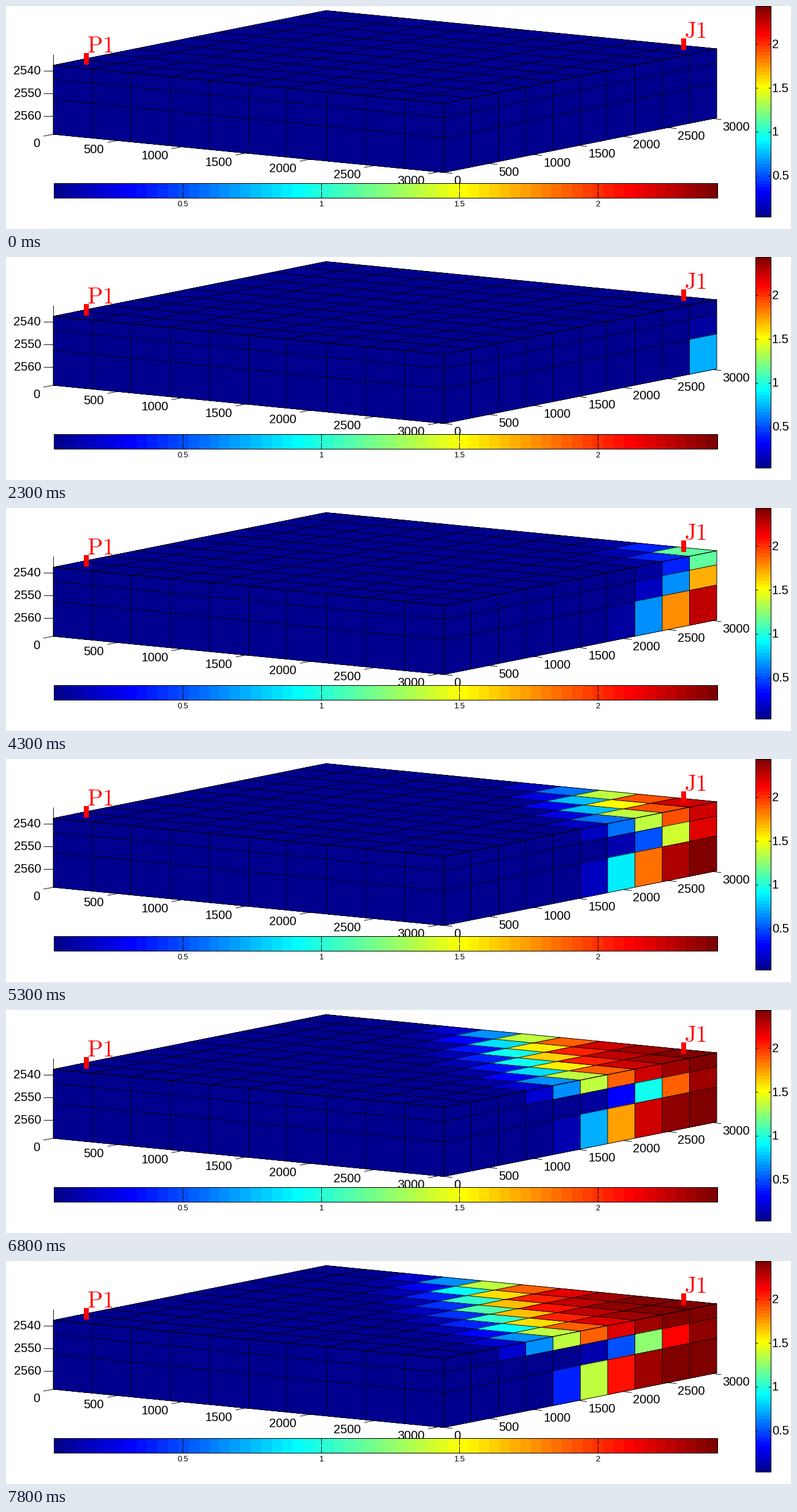
A matplotlib script for the animation above (8 s loop, 1280 by 365 pixels).

```python
import numpy as np
import matplotlib.pyplot as plt
from matplotlib.animation import FuncAnimation
from matplotlib.collections import LineCollection, PolyCollection
from matplotlib.patches import Rectangle

W, H, DPI = 1280, 365, 100
PX = 72 / DPI
INTERVAL, FRAMES = 100, 80
CELLS = 10
V_MIN, V_MAX = 0.0347, 2.432

plt.rcParams["font.family"] = "Liberation Sans"
plt.rcParams["mathtext.fontset"] = "cm"

# Projected block: left corner, one cell along each side, layer depths.
LEFT = np.array([77.0, 97.0])
EX = np.array([63.7, 6.25])
EY = np.array([44.5, -8.95])
DEPTHS = (0, 23, 56, 113)

# Per layer: key points (step, front position in cells from the injector),
# then how steeply the concentration falls ahead of and behind the front.
TOP = [(5, -2.2), (6, -1.33), (8, -0.07), (10, 2.2), (13, 4.24), (15, 5.24)], 1.25, 0.95
MIDDLE = [(4, -1.5), (6, -0.43), (8, 0.42), (10, 1.15), (15, 2.05)], 1.35, 1.65
BOTTOM = [(0, -1.5), (2, -0.7), (5, -0.1), (6, 0.39), (10, 2.72), (15, 4.16)], 1.8, 1.4


def concentration(layer, step, distance):
    """Logistic front that moves away from the injector and flattens."""
    keys, ahead, behind = layer
    offset = distance - np.interp(step, *zip(*keys))
    slope = np.where(offset > 0, ahead, behind) * (1 + 1.2 * np.exp(-step / 5))
    return V_MAX / (1 + np.exp(slope * offset))


def jet(n=64):
    k = np.arange(1, n + 1)

    def ramp(i):
        return np.clip(np.minimum(i, 48 - i) / 16, 0, 1)

    return np.stack([ramp(k - 24), ramp(k - 8), ramp(k + 8)], axis=1)


JET = jet()


def color_of(values):
    k = (values - V_MIN) / (V_MAX - V_MIN) * len(JET)
    return JET[np.clip(k.astype(int), 0, len(JET) - 1)]


def corner(i, j, depth=0):
    return LEFT + i * EX + j * EY + (0, depth)


def path(*corners):
    return [corner(*c) for c in corners]


def build_faces():
    span = range(CELLS)
    slabs = list(zip(DEPTHS, DEPTHS[1:]))
    top = [path((i, j), (i + 1, j), (i + 1, j + 1), (i, j + 1))
           for i in span for j in span]
    front = [path((i, 0, a), (i + 1, 0, a), (i + 1, 0, b), (i, 0, b))
             for a, b in slabs for i in span]
    side = [path((CELLS, j, a), (CELLS, j + 1, a), (CELLS, j + 1, b), (CELLS, j, b))
            for a, b in slabs for j in span]
    return top + front + side


def build_grid():
    n, bottom = CELLS, DEPTHS[-1]
    grid = [path((0, 0, d), (n, 0, d), (n, n, d)) for d in DEPTHS]
    for k in range(n + 1):
        grid.append(path((k, n), (k, 0), (k, 0, bottom)))
        grid.append(path((0, k), (n, k), (n, k, bottom)))
    return grid


def face_colors(step):
    away = CELLS - 1 - np.arange(CELLS)
    di, dj = np.meshgrid(away, away, indexing="ij")
    # The front runs slightly ahead away from the block's edges.
    lead = 0.024 * step * np.sqrt(np.minimum(di, dj))
    top = concentration(TOP, step, di + dj - lead)
    front = np.zeros(3 * CELLS)
    side = [concentration(layer, step, away) for layer in (TOP, MIDDLE, BOTTOM)]
    return color_of(np.concatenate([top.ravel(), front, *side]))


fig = plt.figure(figsize=(W / DPI, H / DPI), dpi=DPI, facecolor="white")
ax = fig.add_axes([0, 0, 1, 1])
ax.axis("off")


def label(x, y, text, size=20, ha="left"):
    ax.text(x, y + 0.32 * size, text, size=size * PX, ha=ha, va="baseline", zorder=3)


def lines(segments, z):
    ax.add_collection(LineCollection(segments, colors="black",
                                     linewidths=0.9 * PX, zorder=z))


def draw_axes():
    bottom = DEPTHS[-1]
    ticks = [[(77, 79), (77, 210)]]
    for k in range(3):
        y = 105.5 + 37 * k
        ticks.append([(61, y), (77, y)])
        label(57, y, str(2540 + 10 * k), ha="right")
    for k in range(7):
        along = 0.985 * k * CELLS / 6
        name = str(500 * k)
        x, y = corner(along, 0, bottom)
        ticks.append([(x, y), (x - 16, y + 3)])
        label(x - 21.5, y + 14.5, name, ha="right")
        x, y = corner(CELLS, along, bottom)
        ticks.append([(x, y), (x + 14, y + 1.5)])
        label(x + 16, y + 13.3, name)
    lines(ticks, 2)


def draw_colorbar(colors, left, right, top, bottom):
    ax.imshow(colors, extent=(left, right, bottom, top), origin="lower",
              aspect="auto", interpolation="nearest", zorder=5)
    ax.add_patch(Rectangle((left, top), right - left, bottom - top, fill=False,
                           ec="black", lw=PX, zorder=6))


def draw_colorbars():
    left, right, top, bottom = 78, 1160, 290, 314
    draw_colorbar(JET[None], left, right, top, bottom)
    draw_colorbar(JET[:, None], 1222, 1247, 0, 345)
    ticks = []
    for value in (0.5, 1, 1.5, 2):
        share = (value - V_MIN) / (V_MAX - V_MIN)
        x = left + share * (right - left)
        y = 345 * (1 - share)
        ticks += [[(x, top), (x, top + 11)], [(x, bottom - 11), (x, bottom)],
                  [(1222, y), (1226, y)], [(1243, y), (1247, y)]]
        label(x, 324, f"{value:g}", size=13, ha="center")
        label(1249, y, f"{value:g}")
    lines(ticks, 6)


def draw_well(x, y, name):
    ax.add_patch(Rectangle((x - 4, y), 8, 19, color="red", lw=0, zorder=4))
    ax.text(x + 0.5, y - 1.5, rf"$\mathrm{{{name}}}$", color="red", size=37 * PX,
            ha="left", va="baseline", zorder=4)


faces = PolyCollection(build_faces(), edgecolors="none", antialiaseds=False, zorder=1)
ax.add_collection(faces)
lines(build_grid(), 1.5)
draw_axes()
draw_colorbars()
draw_well(131, 77, "P1")
draw_well(1105, 53, "J1")
ax.set_xlim(0, W)
ax.set_ylim(H, 0)


def update(frame):
    ms = frame * INTERVAL
    step = 0 if ms < 800 else 1 + (ms - 800) // 500
    faces.set_facecolor(face_colors(step))
    return [faces]


anim = FuncAnimation(fig, update, frames=FRAMES, interval=INTERVAL,
                     repeat=True, repeat_delay=0)
plt.show()
```
